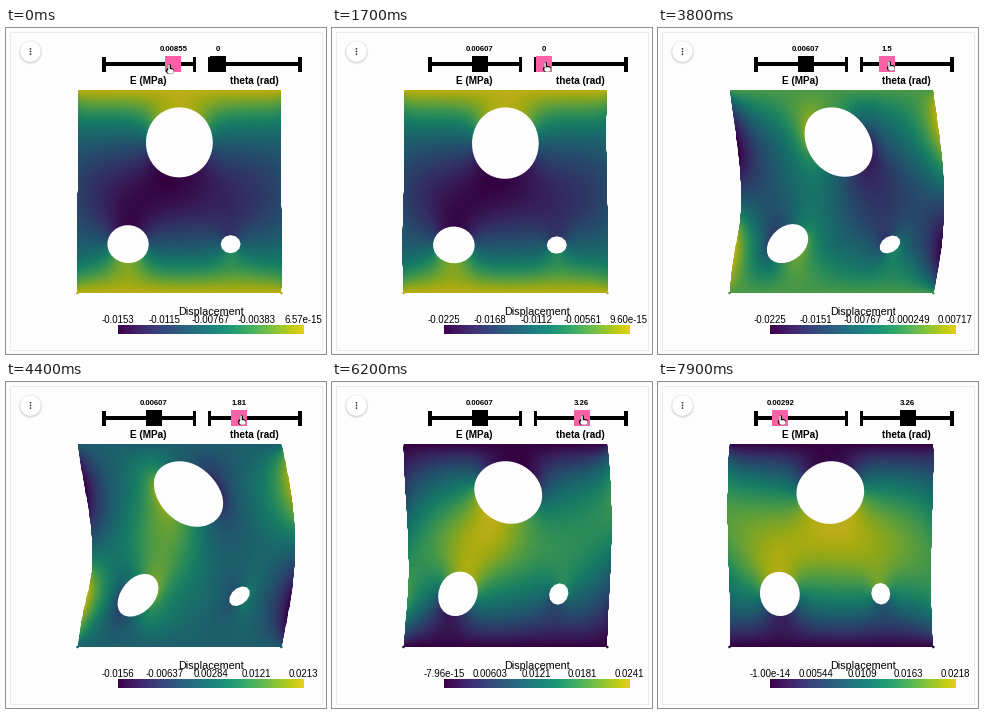
Write a matplotlib script that moves like this. It is 320 px wide and 326 px high and loops after 8 s.

```python
import numpy as np
import matplotlib.pyplot as plt
from matplotlib.animation import FuncAnimation
from matplotlib.colors import ListedColormap
from matplotlib.patches import Circle, Polygon, Rectangle

W, H, DPI = 320, 326, 100
FRAMES, STEP = 80, 100
BG, INK, PINK = "#fdfdfd", "#000000", "#fb61a6"
HOLES = [(0.5, 0.25, 0.165), (0.25, 0.75, 0.1), (0.75, 0.75, 0.048)]
N, NU = 64, 0.3
E_REF, PEAK = 0.00607, 0.022455


# Plane-stress plate with three holes, clamped along top and bottom
def element_stiffness():
    D = np.array([[1, NU, 0], [NU, 1, 0], [0, 0, (1 - NU) / 2]]) / (1 - NU**2)
    xi, eta = np.array([-1, 1, 1, -1]), np.array([-1, -1, 1, 1])
    K = np.zeros((8, 8))
    for a in (-1, 1):
        for b in (-1, 1):
            dx = xi * (1 + eta * b / 3**0.5) / 2
            dy = eta * (1 + xi * a / 3**0.5) / 2
            B = np.zeros((3, 8))
            B[0, ::2] = B[2, 1::2] = dx
            B[1, 1::2] = B[2, ::2] = dy
            K += B.T @ D @ B / 4
    return K


def solid(x, y, grow=0.0):
    return np.all([np.hypot(x - cx, y - cy) > r + grow for cx, cy, r in HOLES], axis=0)


M = N + 1
sub = (np.arange(4 * N) + 0.5) / (4 * N)
rho = solid(*np.meshgrid(sub, sub)).reshape(N, 4, N, 4).mean(axis=(1, 3)).ravel()
stiff = 1e-3 + (1 - 1e-3) * rho
first = (np.arange(N)[:, None] * M + np.arange(N)).ravel()
corners = first[:, None] + np.array([0, 1, M + 1, M])
dofs = np.stack([2 * corners, 2 * corners + 1], axis=2).reshape(-1, 8)
free = np.ones((M, M, 2))
free[[0, -1]] = 0
free = free.ravel()
K = element_stiffness()


def gather(values):
    return np.bincount(dofs.ravel(), values.ravel(), minlength=2 * M * M)


def solve(direction):
    """Displacement under a uniform body force, by preconditioned CG."""
    b = gather(rho[:, None] * np.tile(direction, 4)) * free
    diag = gather(stiff[:, None] * np.diag(K))
    u, r = np.zeros_like(b), b.copy()
    z = r / diag
    p, rz = z.copy(), r @ z
    stop = 1e-9 * rz
    for _ in range(1500):
        Ap = gather((p[dofs] @ K) * stiff[:, None]) * free
        alpha = rz / (p @ Ap)
        u += alpha * p
        r -= alpha * Ap
        z = r / diag
        rz, old = r @ z, rz
        if rz < stop:
            break
        p = z + rz / old * p
    return u.reshape(M, M, 2)


gx, gy = np.meshgrid(np.linspace(0, 1, M), np.linspace(0, 1, M))
inside = solid(gx, gy, 0.004)
down, right = solve([0.0, 1.0]), solve([1.0, 0.0])
gain = PEAK / down[..., 1][inside].max()


def sample(u, x, y):
    i, j = (x * N).astype(int), (y * N).astype(int)
    s, t = (x * N - i)[:, None], (y * N - j)[:, None]
    return ((1 - t) * ((1 - s) * u[j, i] + s * u[j, i + 1])
            + t * ((1 - s) * u[j + 1, i] + s * u[j + 1, i + 1]))


def to_stage(x, y, u):
    return 71.5 + 203.8 * (x + u[..., 0]), 62 + 203.2 * (y + u[..., 1])


# Stage
fig = plt.figure(figsize=(W / DPI, H / DPI), dpi=DPI, facecolor=BG)
ax = fig.add_axes([0, 0, 1, 1])
ax.axis("off")


def dimmed(level):
    colors = plt.get_cmap("viridis")(np.linspace(0, 1, 256))
    return ListedColormap(colors * [level, level, level, 1])


def text(x, y, s, size, weight="normal"):
    return ax.text(x, y, s, fontsize=size * 72 / DPI, weight=weight, color=INK,
                   family="Liberation Sans", ha="center", va="baseline", zorder=4)


def box(x, y, w, h, z=3):
    return ax.add_patch(Rectangle((x, y), w, h, fc=INK, ec="none", zorder=z))


def disc(x, y, r, color, z=1, alpha=1):
    return ax.add_patch(Circle((x, y), r, fc=color, ec="none", zorder=z, alpha=alpha))


def shape(x, y, color):
    points = np.column_stack([x, y])
    return ax.add_patch(Polygon(points, fc=color, ec="none", zorder=2))


ax.add_patch(Rectangle((3.5, 3.5), 312, 318.5, fc=BG, ec="#ebebeb", lw=0.72))
for k in range(4):
    disc(24.5, 24.3, 12 - 0.5 * k, "black", alpha=0.035)
disc(24.5, 23.5, 10.2, "white", z=2)
for k in (-1, 0, 1):
    disc(24.5, 23.5 + 2.6 * k, 0.85, "#333333", z=3)

plate_map = dimmed(0.75)
ax.imshow(np.linspace(0, 1, 256)[None], cmap=dimmed(0.9), aspect="auto",
          extent=(112, 297.5, 306.5, 297.8), zorder=1)
text(205, 287, "Displacement", 10.8)


class Result:
    """Deformed plate and colour bar labels for one solved load."""

    def __init__(self, E, theta, lo, hi):
        u = gain * E_REF / E * (np.cos(theta) * down + np.sin(theta) * right)
        rise = -u[..., 1]
        vmin, vmax = rise[inside].min(), rise[inside].max()
        X, Y = to_stage(gx, gy, u)
        mesh = ax.pcolormesh(X, Y, rise, shading="gouraud", cmap=plate_map,
                             vmin=vmin, vmax=vmax, zorder=1)
        rim = [np.r_[A[0], A[1:, -1], A[-1, ::-1], A[::-1, 0]] for A in (X, Y)]
        outline = shape(*rim, "none")
        mesh.set_clip_path(outline)
        self.parts = [mesh]
        for cx, cy, r in HOLES:
            sides = int(250 * r)
            a = np.arange(sides) * 2 * np.pi / sides
            x, y = cx + r * np.cos(a), cy + r * np.sin(a)
            self.parts.append(shape(*to_stage(x, y, sample(u, x, y)), BG))
        rest = plate_map(-vmin / (vmax - vmin))
        self.parts += [disc(x, 265, 1.3, rest, z=2) for x in (71.5, 275.3)]
        for k, value in enumerate(np.linspace(lo, hi, 5)):
            self.parts.append(text(112 + 46.25 * k, 295.3, f"{value:#.3g}", 9.6))

    def show(self, on):
        for part in self.parts:
            part.set_visible(on)


class Slider:
    def __init__(self, x0, x1, title, start, zero, slope):
        self.start, self.zero, self.slope = start, zero, slope
        box(x0, 34.2, x1 - x0, 3.6)
        for x in (x0, x1):
            box(x - 1.6, 28.5, 3.2, 15)
        text((x0 + x1) / 2 - 0.5, 56.2, title, 10, "bold")
        self.knob = box(0, 28, 16, 16, z=4)
        self.label = text(0, 23, "", 7.75, "bold")

    def value(self, frame):
        v = self.start
        for slider, grab, release, goal in DRAGS:
            if slider is self:
                v += (goal - v) * np.clip((frame - grab) / (release - 2 - grab), 0, 1)
        return float(v)

    def x(self, frame):
        return self.zero + self.slope * self.value(frame)

    def draw(self, frame):
        held = any(s is self and a <= frame < b for s, a, b, _ in DRAGS)
        self.knob.set_x(self.x(frame) - 8)
        self.knob.set_facecolor(PINK if held else INK)
        self.label.set_x(self.x(frame))
        self.label.set_text(f"{self.value(frame):.3g}")


modulus = Slider(98, 188.5, "E (MPa)", 0.00855, 99, 8000)
angle = Slider(203.5, 294, "theta (rad)", 0, 211.5, 11.75)

# Slider, grab frame, release frame, value at release
DRAGS = [
    (modulus, 0, 6, 0.00607),
    (angle, 17, 26, 0.87),
    (angle, 34, 42, 1.81),
    (angle, 44, 53, 2.84),
    (angle, 55, 63, 3.26),
    (modulus, 71, 81, 0.00292),
]

# The plate is solved anew each time a slider is let go
RANGES = [(-0.015335, 6.57e-15), (-0.022455, 9.60e-15), (-0.022506, 0.00717),
          (-0.01558, 0.021265), (-7.96e-15, 0.02412), (-1.00e-14, 0.02176)]
LOADS = [(0.00889, 0)] + [(modulus.value(d[2]), angle.value(d[2])) for d in DRAGS[:-1]]
RESULTS = [Result(*load, *span) for load, span in zip(LOADS, RANGES)]


class Hand:
    """Pointing hand: a finger and a palm, white over a black rim."""

    def __init__(self):
        self.strokes = []
        for color, rim, z in (("black", 1.5, 6), ("white", 0, 7)):
            for x, y, width in (([-1.4, -1.4], [-3.6, 1], 1.5), ([-0.9, 1.4], [2.2, 2.2], 4.6)):
                line, = ax.plot(x, y, color=color, lw=(width + rim) * 72 / DPI,
                                solid_capstyle="round", zorder=z)
                self.strokes.append((line, np.array(x), np.array(y)))

    def move(self, x, y):
        for line, dx, dy in self.strokes:
            line.set_data(x + dx, y + dy)


hand = Hand()
ax.set_xlim(0, W)
ax.set_ylim(H, 0)


def pointer_x(frame):
    """Lead the knob by one frame; glide over just before the next grab."""
    x = modulus.x(frame + 1)
    for slider, grab, _, _ in DRAGS[1:]:
        p = np.clip((frame - grab + 7) / 6, 0, 1)
        x += (slider.x(frame + 1) - x) * p * p * (3 - 2 * p)
    return x + 1.5


def update(frame):
    current = sum(frame >= release for _, _, release, _ in DRAGS)
    for k, result in enumerate(RESULTS):
        result.show(k == current)
    modulus.draw(frame)
    angle.draw(frame)
    hand.move(pointer_x(frame), 38 + 3 * max(0, 1 - frame / 20))
    return []


anim = FuncAnimation(fig, update, frames=FRAMES, interval=STEP, repeat=True, repeat_delay=0)
plt.show()
```
